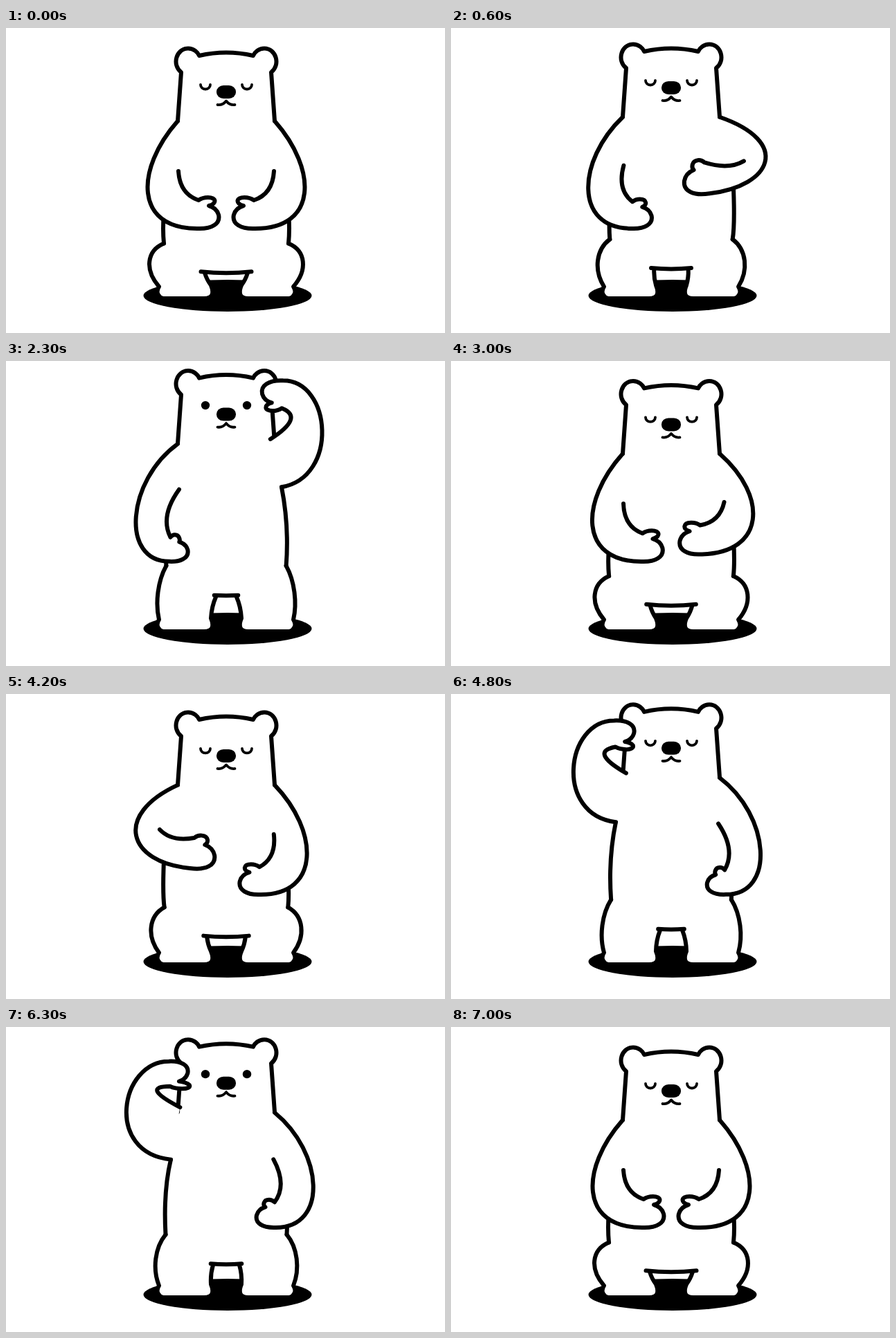
Animation of 634 by 441 pixels, one loop 7.6 s. Source, as an HTML page:

```html
<!DOCTYPE html>
<html lang="en">
<head>
<meta charset="utf-8">
<title>Stretching bear</title>
<style>
  html, body { margin: 0; width: 100%; height: 100%; overflow: hidden; background: #fff; }
  svg { display: block; width: 100%; height: 100%; }
  .line { fill: none; stroke: #000; stroke-width: 6; stroke-linecap: round; stroke-linejoin: round; }
  .limb { fill: #fff; }
  .fine { stroke-width: 3.8; }
</style>
</head>
<body>
<svg viewBox="0 0 634 441">
  <ellipse cx="320" cy="387" rx="121.5" ry="23"/>
  <g id="bear">
    <path id="legL" class="line limb"/>
    <path id="legR" class="line limb"/>
    <path id="crotch" class="line"/>
    <path id="sides" class="line"/>
    <g id="head">
      <path class="line limb" d="M248 134.500L253 64C239 53 246 29.500 263 29.500C271 29.500 277 35 279 40Q318 31 357 40C359 35 365 29.500 373 29.500C390 29.500 397 53 383 64L388 134.500"/>
      <path id="shut" class="line fine" d="M281 82a7 6.5 0 0 0 14 0M341 82a7 6.5 0 0 0 14 0"/>
      <g id="open"><circle cx="288" cy="79.5" r="6.2"/><circle cx="348" cy="79.5" r="6.2"/></g>
      <rect x="304" y="83" width="28" height="19" rx="10" ry="9"/>
      <path class="line fine" d="M305.500 111Q313 112 318 105.500Q323 112 330.500 111"/>
    </g>
    <g transform="translate(636) scale(-1 1)"><path id="hipArm" class="line limb"/></g>
    <path id="topArm" class="line limb"/>
  </g>
</svg>
<script>
const LOOP = 7600, HALF = LOOP / 2, STEP = 100;
const NEAR = 0.16; // share of the move spent close to either end pose
const el = id => document.getElementById(id);
const shape = (id, d) => el(id).setAttribute('d', d);
const mix = (a, b, k) => a.map((v, i) => v + (b[i] - v) * k);

// Arm pose: elbow pull x y, its reach, hand x y, tilt, size, thumb, inner bend x y, inner end x y.
const rest = [450, 205, 90, 358, 249, 0, 1, -23, 385, 240, 387, 207];
const lift = [482, 175, 90, 364, 208, -0.09, 1.08, -16, 397, 214, 414, 196];
const brow = [477, 164, 70, 398, 63, 0, 1, -20, 428, 80, 381, 112];
const high = [434, 120, 70, 395, 7, 0, 1.3, 14, 392, 65, 372, 102];
const hip = [462, 172, 70, 400, 255, 0, 0.85, -12, 415, 224, 386, 185];
const hang = [460, 185, 66, 413, 274, 0, 0.55, 34, 414, 233, 388, 196];

// How far the stretch has gone, 0 to 1, at a few moments of one half.
const keys = [[0, 0], [400, NEAR], [1100, 1 - NEAR], [1300, 1],
  [1900, 1], [2300, 0.81], [3000, 0.03], [3200, 0]];

// Monotone cubic through the keys.
function stretch(time) {
  const last = keys.length - 1;
  const i = keys.findIndex(([t]) => t > time) - 1;
  if (i < 0) return 0;
  const rate = k => (keys[k + 1][1] - keys[k][1]) / (keys[k + 1][0] - keys[k][0]);
  const slope = k => {
    if (k === 0 || k === last) return 0;
    const a = rate(k - 1), b = rate(k);
    return a * b > 0 ? 2 * a * b / (a + b) : 0;
  };
  const [t0, from] = keys[i], [t1, to] = keys[i + 1];
  const span = t1 - t0, s = (time - t0) / span;
  return from + (to - from) * s * s * (3 - 2 * s)
    + span * s * (1 - s) * ((1 - s) * slope(i) - s * slope(i + 1));
}

// Leaves an end pose quickly, is 1 at NEAR and levels off at 1.5.
const swing = p => 1.5 * (1 - Math.pow(3, -p / NEAR));

function armPath(pose, start, flip) {
  const [cx, cy, reach, x, y, tilt, size, thumb, mx, my, ex, ey] = pose;
  const c = Math.cos(tilt) * size, s = Math.sin(tilt) * size;
  const at = (u, v) => `${x + u * c - v * flip * s} ${y + u * s + v * flip * c} `;
  return `M${start}C${cx} ${cy} ${at(2 + reach / size, 41)}${at(2, 41)}`
    + `C${at(-19, 42)}${at(-32, 34)}${at(-29, 21)}Q${at(-26, 11)}${at(-15, 8)}`
    + `C${at(thumb - 4, 5)}${at(thumb - 3, -4)}${at(thumb * 0.6, -4)}`
    + `Q${at(thumb * 0.25, -4)}${at(0, 0)}Q${mx} ${my} ${ex} ${ey}`;
}

function legPath(h, mirror) {
  const at = (x, y) => `${mirror ? 636 - x : x} ${y} `;
  return 'M' + at(228 + 0.22 * h, 311.5 - h)
    + 'C' + at(203 + 1.05 * h, 322 - 0.25 * h) + at(200 + h, 350) + at(221, 374)
    + 'Q' + at(216, 382) + at(221, 387) + 'Q' + at(223, 391) + at(230, 391)
    + 'L' + at(286, 391) + 'Q' + at(297, 391) + at(298, 384)
    + 'Q' + at(299, 379) + at(296, 372)
    + 'Q' + at(290 + 0.45 * h, 364 - 0.6 * h) + at(287 + 1.05 * h, 354 - 0.85 * h);
}

function draw(time) {
  const t = Math.floor(time / STEP) * STEP % LOOP, u = t % HALF;
  const p = stretch(u), h = 19 * p;
  const raised = p > 0.5;
  const top = Math.max(0, (p - 1 + NEAR) / NEAR);
  const neck = `388 ${134.5 - 0.95 * h}`, armpit = `398 ${218 - 2.32 * h}`;

  el('bear').setAttribute('transform', t >= HALF ? 'translate(636) scale(-1 1)' : '');
  el('head').setAttribute('transform', `translate(0 ${-h})`);
  const awake = u >= 1200 && u < 2600;
  el('open').style.display = awake ? '' : 'none';
  el('shut').style.display = awake ? 'none' : '';

  shape('legL', legPath(h, false));
  shape('legR', legPath(h, true));
  const half = 36.5 - 1.25 * h, y = 352.3 - 0.88 * h;
  shape('crotch', `M${318 - half} ${y}Q318 ${y + 4 - 0.2 * h} ${318 + half} ${y}`);

  const hipX = 408 - 0.22 * h, hipY = 311.5 - h;
  const side = raised ? `M${armpit}Q409 238 ` : `M408 ${264 - 24 * swing(p)}Q410 ${hipY - 20} `;
  shape('sides', `${side}${hipX} ${hipY}`
    + `M${228 + 0.25 * h} ${266 - 36 * top}Q${226 + 0.3 * h} ${hipY - 20} ${636 - hipX} ${hipY}`);

  const low = mix(rest, hip, Math.min(1, p / (1 - NEAR)));
  shape('hipArm', armPath(mix(low, hang, top), neck, 1));
  shape('topArm', raised ? armPath(mix(high, brow, swing(1 - p)), armpit, -1)
    : armPath(mix(rest, lift, swing(p)), neck, 1));
}

const start = performance.now();
function tick() {
  draw(performance.now() - start);
  requestAnimationFrame(tick);
}
tick();
</script>
</body>
</html>
```
